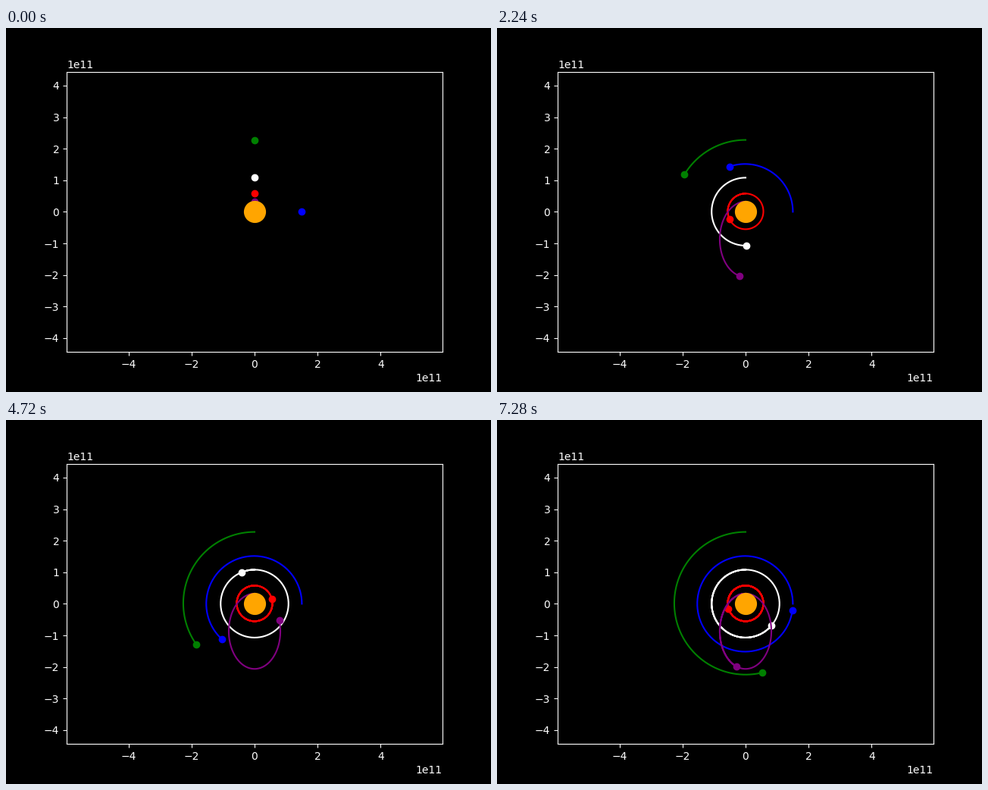
A matplotlib script for the animation above (7.3 s loop, 640 by 480 pixels).

```python
import numpy as np
import matplotlib.pyplot as plt
from matplotlib.animation import FuncAnimation

DAYS = 365
SUBSTEPS = 40
GM = 6.67e-11 * 2e30

# colour, start position (m), start velocity (m/s); later bodies lie on top
BODIES = [
    ("blue", (1.5e11, 0), (0, 29980)),
    ("green", (0, 2.279e11), (-24100, 0)),
    ("white", (0, 1.082e11), (-35020, 0)),
    ("red", (0, 5.79e10), (-47420, 0)),
    ("purple", (0, 3.25e10), (-84214, 0)),
]


def pull(pos):
    r = np.hypot(pos[:, 0], pos[:, 1])[:, None]
    return -GM * pos / r**3


def simulate():
    """Daily positions from leapfrog integration, shape (day, body, xy)."""
    pos = np.array([b[1] for b in BODIES], float)
    vel = np.array([b[2] for b in BODIES], float)
    dt = 86400 / SUBSTEPS
    track = [pos.copy()]
    acc = pull(pos)
    for _ in range(DAYS - 1):
        for _ in range(SUBSTEPS):
            vel += acc * dt / 2
            pos += vel * dt
            acc = pull(pos)
            vel += acc * dt / 2
        track.append(pos.copy())
    return np.array(track)


track = simulate()

plt.style.use("dark_background")
fig, ax = plt.subplots(figsize=(6.4, 4.8), dpi=100)
half_h = 4.4423e11
half_w = half_h * 496 / 369.6
ax.set_xlim(-half_w, half_w)
ax.set_ylim(-half_h, half_h)

trails, dots = [], []
for color, *_ in BODIES:
    trails += ax.plot([], [], color=color, lw=1.5)
    dots += ax.plot([], [], "o", color=color, ms=6)
ax.plot([0], [0], "o", color="orange", ms=20)


def update(day):
    for i, (trail, dot) in enumerate(zip(trails, dots)):
        trail.set_data(track[:day + 1, i, 0], track[:day + 1, i, 1])
        dot.set_data(track[day:day + 1, i, 0], track[day:day + 1, i, 1])
    return trails + dots


anim = FuncAnimation(fig, update, frames=DAYS, interval=20, repeat=True)
plt.show()
```
